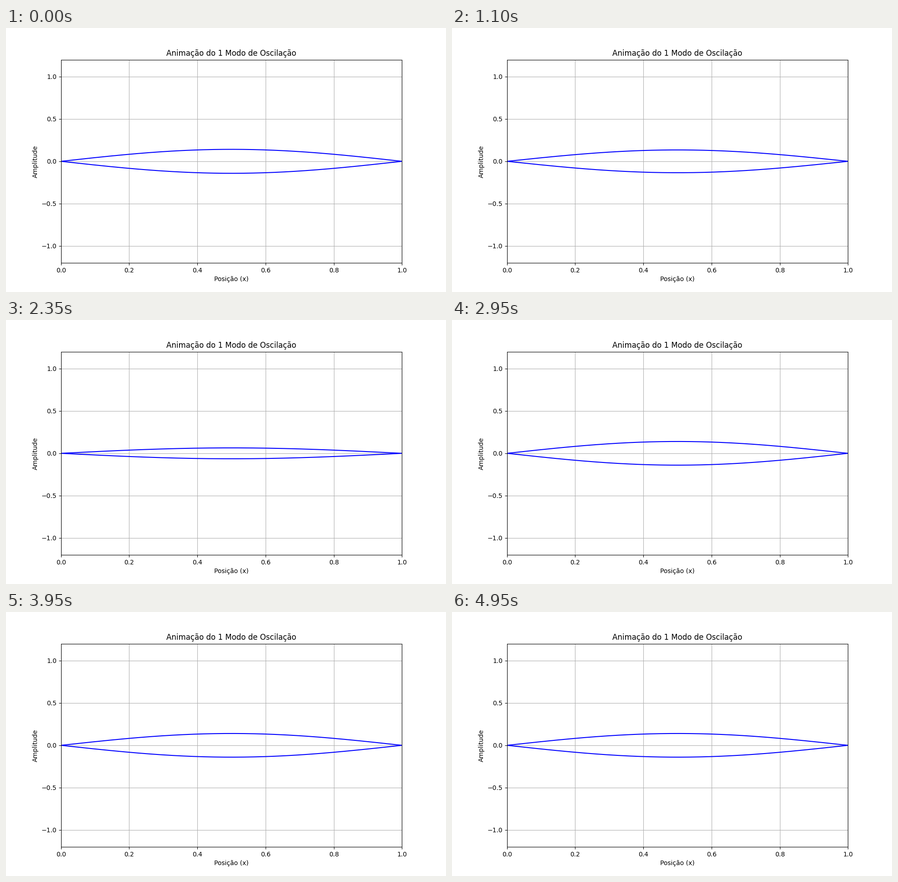
Animation of 966 by 580 pixels, one loop 5000 ms. Source, as a matplotlib script:

```python
import matplotlib.pyplot as plt
import numpy as np
from matplotlib.animation import FuncAnimation

DPI = 100
FRAMES = 100
INTERVAL = 50  # ms

LENGTH = 1.0
MODE = 1
OMEGA = np.pi  # rad/s
AMPLITUDE = 0.1 * np.sqrt(2 / LENGTH)

x = np.linspace(0, LENGTH, 1000)
shape = AMPLITUDE * np.sin(MODE * np.pi * x / LENGTH)

fig, ax = plt.subplots(figsize=(966 / DPI, 580 / DPI), dpi=DPI)
ax.set_xlim(0, LENGTH)
ax.set_ylim(-1.2, 1.2)
ax.set_title(f"Animação do {MODE} Modo de Oscilação")
ax.set_xlabel("Posição (x)")
ax.set_ylabel("Amplitude")
ax.grid(True)

upper, = ax.plot(x, shape, color="blue")
lower, = ax.plot(x, -shape, color="blue")


def update(frame):
    t = frame * INTERVAL / 1000
    y = shape * np.cos(OMEGA * t)
    upper.set_ydata(y)
    lower.set_ydata(-y)
    return upper, lower


anim = FuncAnimation(fig, update, frames=FRAMES, interval=INTERVAL,
                     repeat=True, repeat_delay=0)
plt.show()
```
